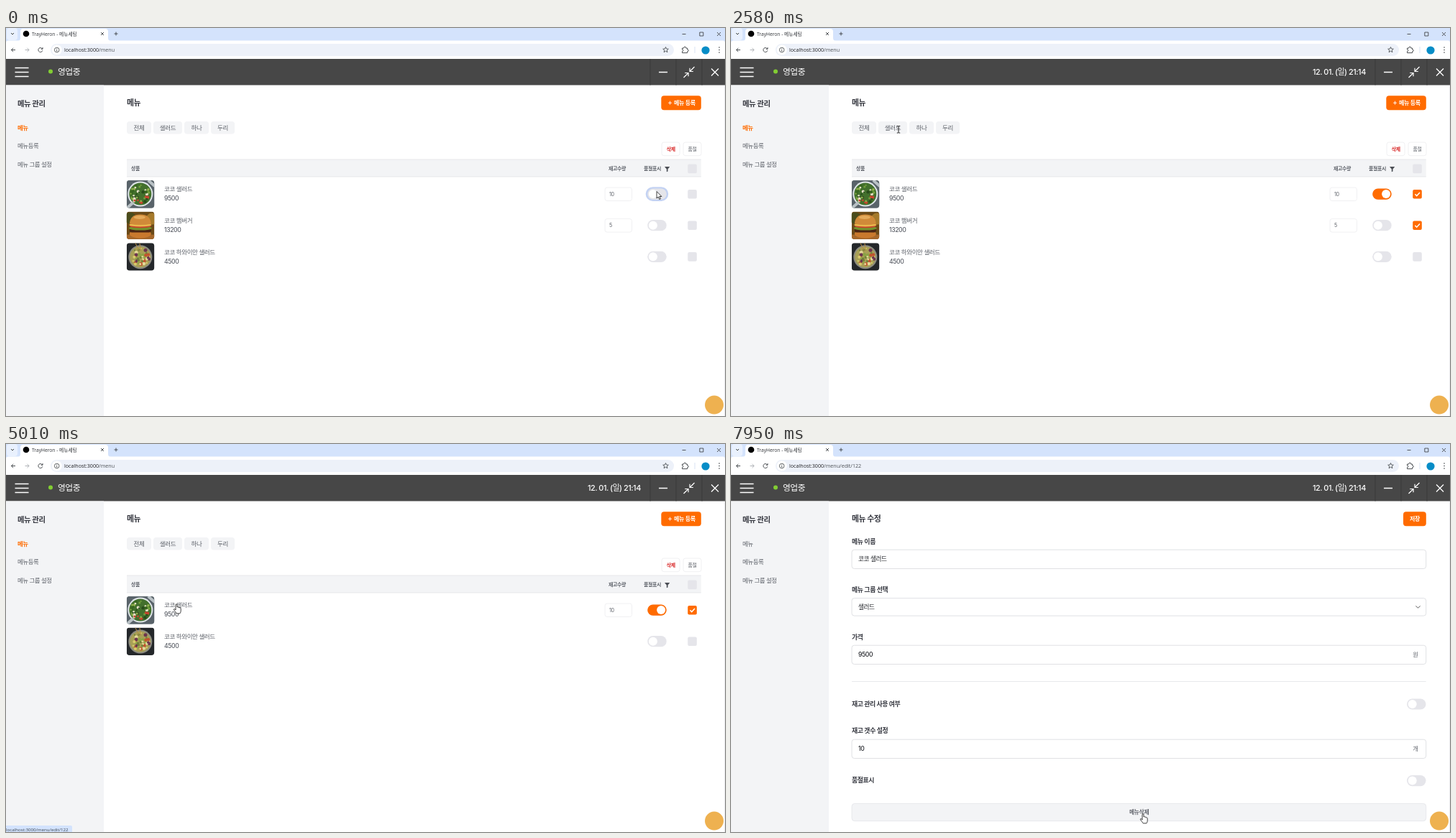
Recreate the animation shown at these times as an HTML page. Size 1000 px wide and 540 px high, loop 7980 ms.

```html
<!DOCTYPE html>
<html lang="ko">
<head>
<meta charset="utf-8">
<title>메뉴세팅</title>
<style>
  html, body { margin: 0; width: 100%; height: 100%; overflow: hidden; background: #fff; }
  svg { display: block; width: 100%; height: 100%; }
  text { font-family: Inter, "Noto Sans CJK KR", "Noto Sans CJK", sans-serif; letter-spacing: -.045em; white-space: pre; }
  .browser text { font-family: "Open Sans", "Noto Sans CJK KR", "Noto Sans CJK", sans-serif; letter-spacing: 0; }
</style>
</head>
<body>
<svg id="stage" viewBox="0 0 1000 540">
  <defs><clipPath id="round"><rect width="38.4" height="38.4" rx="4"/></clipPath></defs>
  <g id="frame"></g>
  <g id="view"></g>
  <g id="cursor"></g>
</svg>
<script>
const LOOP = 7980;
const ORANGE = '#ff6b00', PALE = '#f3f4f6', GREY = '#e5e5ea', INK = '#363840', SOFT = '#5c6068';
const T = { toggle: 120, checkFirst: 930, clock: 1110, checkSecond: 1290, filter: 3270, hover: 4320, open: 5130 };

const clamp = v => Math.max(0, Math.min(1, v));
const ease = v => v * v * (3 - 2 * v);
const between = (t, a, b) => t >= a && t < b;

const rect = (x, y, w, h, fill, rx = 0, more = '') =>
  `<rect x="${x}" y="${y}" width="${w}" height="${h}" rx="${rx}" fill="${fill}" ${more}/>`;
const circle = (x, y, r, fill, more = '') => `<circle cx="${x}" cy="${y}" r="${r}" fill="${fill}" ${more}/>`;
const ellipse = (x, y, rx, ry, fill) => `<ellipse cx="${x}" cy="${y}" rx="${rx}" ry="${ry}" fill="${fill}"/>`;
const line = (d, color, width = 1) => `<path d="${d}" fill="none" stroke="${color}" stroke-width="${width}"/>`;
const text = (x, y, s, size = 8.5, fill = INK, weight = 500, anchor = 'start') =>
  `<text x="${x}" y="${y}" font-size="${size}" fill="${fill}" font-weight="${weight}" text-anchor="${anchor}">${s}</text>`;
const box = (x, y, w, h, border = '#ececef', rx = 3) => rect(x, y, w, h, '#fff', rx, `stroke="${border}" stroke-width=".8"`);

// ---- pictures ----
function random(seed) {
  return () => (seed = seed * 16807 % 2147483647) / 2147483647;
}
function bowl(ground, rim, base, colors, seed, cx, cy, r) {
  const next = random(seed);
  let out = rect(0, 0, 39, 39, ground) + circle(cx, cy, r, rim) + circle(cx, cy, r - 2, base);
  for (let i = 0; i < 42; i++) {
    const angle = next() * 6.283, d = Math.sqrt(next()) * (r - 4);
    out += circle((cx + d * Math.cos(angle)).toFixed(1), (cy + d * Math.sin(angle)).toFixed(1),
      (1 + next() * 1.5).toFixed(1), colors[i % colors.length]);
  }
  return out;
}
const salad = rect(0, 0, 39, 39, '#7d858a') +
  bowl('#59636a', '#dfe5e8', '#43702d', ['#37651f', '#72a03b', '#c9432e', '#294c1c', '#e5dfc5', '#8fb04b'], 71, 19, 19, 17.5) +
  line('M0 39L9 31M30 0L39 8', '#b9c1c5', 4);
const burger = rect(0, 0, 39, 39, '#6b4a18') + circle(5, 9, 8, '#4a4c1c') + circle(35, 10, 8, '#a67a2b') +
  rect(0, 32, 39, 7, '#a5672b') + ellipse(19, 31, 15, 6, '#c9792d') + rect(4, 23, 30, 6, '#4a2513', 3) +
  ellipse(19, 23, 16, 3, '#75912d') + ellipse(19, 20, 15, 2.6, '#c8402b') + ellipse(19, 18.5, 15.5, 2.5, '#e9b64b') +
  '<path d="M4 17Q5 4 19 4T34 17Q19 20 4 17Z" fill="#d08a39"/>' + ellipse(18, 8, 8, 2.5, '#e4aa5b');
const hawaiian = bowl('#24272a', '#8c8b80', '#a8a056', ['#d9c96c', '#8ba345', '#c0552e', '#e4d998', '#6e8138', '#6d3650'], 29, 19, 19.5, 16.5) +
  line('M12 0L18 12M18 0L20 11', '#b58a45', 1);

// ---- window, header and sidebar ----
function browser() {
  const dark = '#3c4043';
  return `<g class="browser">` +
    rect(0, 0, 1000, 26, '#d4e3fc') + rect(1, 0, 15, 17, '#e9f1fe', 4) + line('M7 7l2 2 2-2', dark, 1) +
    '<path d="M16 18q4 0 4-4V5q0-4 4-4h114q4 0 4 4v9q0 4 4 4z" fill="#fff"/>' + rect(0, 17.5, 1000, 26, '#fff', 3) +
    circle(28, 8, 4.3, '#000') + text(36, 10.6, 'TrayHeron - 메뉴세팅', 6.7, '#303338', 400) +
    line('M132 6l4 4m0-4l-4 4M150.500 8h5M153 5.500v5', dark, .9) +
    line('M940.500 8.500h5M964.800 6h5v5h-5zM989 6l5 5m0-5l-5 5', '#333', .8) +
    line('M13 30.500H7.500m2.600-2.700L7.400 30.500l2.700 2.700', dark, .9) +
    line('M26.500 30.500H32m-2.600-2.700l2.700 2.700-2.700 2.700', '#a9acb0', .9) +
    line('M50.500 29a3 3 0 1 0 .3 2.300M51 27v2.300h-2.300', dark, .9) +
    rect(62, 22, 867, 17, '#edf1f9', 8.5) + circle(70.7, 30.5, 7, '#fff') +
    circle(70.7, 30.5, 3.3, 'none', `stroke="${dark}" stroke-width=".8"`) + line('M70.700 28.500v.9m0 .8v2.300', dark, .9) +
    line('M917.500 26.500l1.100 2.500 2.700.2-2.100 1.800.7 2.700-2.400-1.500-2.400 1.500.7-2.700-2.100-1.800 2.700-.2z', dark, .8) +
    line('M940.500 28h2.300q0-2 1.400-2t1.400 2h2v2q1.700 0 1.700 1.300t-1.700 1.300v2h-7.100v-2q1.400 0 1.400-1.300t-1.400-1.300z', dark, .9) +
    line('M958 26v9', '#d0dcf0', .8) + circle(973, 31, 5.6, '#078dc7') +
    [27, 30.5, 34].map(y => circle(992, y, .8, dark)).join('') + '</g>';
}
function appHeader() {
  return rect(0, 43, 1000, 36.5, '#474747') +
    line('M12.500 55.500h19M12.500 61.500h19M12.500 67.500h19', '#fff', 1.4) +
    circle(62, 60.5, 3, '#82cd33') + text(72, 64.6, '영업중', 11.8, '#fff') +
    line('M896 43v36.500M932 43v36.500M968 43v36.500', '#3b3b3b') +
    line('M908 61.500h12M981 56.500l10 10m0-10l-10 10', '#fff', 1.3) +
    line('M957.500 54l-6.500 6.500m0-4.700v4.700h4.800M942.500 69l6.500-6.500m-4.800 0h4.800v4.700', '#fff', 1.2);
}
document.getElementById('frame').innerHTML = rect(0, 0, 1000, 540, '#fff') + browser() + appHeader() +
  rect(0, 79.5, 136, 461, PALE) + line('M999.500 80v460', '#ededf0') +
  text(16, 109, '메뉴 관리', 10.4, INK, 600) + text(16, 167, '메뉴등록', 8.4, SOFT) +
  text(16, 193.4, '메뉴 그룹 설정', 8.4, SOFT) + circle(985, 524.6, 13, '#eeb150');

// ---- controls ----
function toggle(x, y, on = 0, ring = false) {
  return (ring ? rect(x - 2.5, y - 2.3, 31.5, 19.8, '#c3d2f3', 9.9) : '') +
    rect(x, y, 26.5, 15.2, GREY, 7.6) + rect(x, y, 26.5, 15.2, ORANGE, 7.6, `opacity="${on}"`) +
    circle(x + 7.7 + on * 11.2, y + 7.6, 6, '#fff');
}
function checkbox(y, on = false, ring = false) {
  return (ring ? rect(946, y - 2, 17, 17, '#bfd0f5', 3.5) : '') + rect(948.2, y, 12.6, 12.6, on ? ORANGE : GREY, 2) +
    (on ? line(`M951.400 ${y + 6.4}l2.300 2.300 4.300-4.600`, '#fff', 1.5) : '');
}
function chip(x, w, label) {
  return rect(x, 130, w, 17.6, PALE, 4) + text(x + w / 2, 141.8, label, 8.5, SOFT, 500, 'middle');
}
function field(y, h, value, unit = '') {
  return box(168, y, 798.7, h, '#d9dade', 3.5) + text(177, y + h / 2 + 2.9, value, 8.6, '#25272c') +
    text(955.5, y + h / 2 + 2.9, unit, 8.2, SOFT, 400, 'end');
}

// ---- pages ----
function menuRow(item, y) {
  return `<g transform="translate(167.800 ${y})" clip-path="url(#round)">${item.picture}</g>` +
    text(220, y + 15.4, item.name, 8.5, SOFT) + text(220, y + 28.3, item.price, 8.6, SOFT) +
    (item.stock ? box(833, y + 10, 37.5, 18.5) + text(839, y + 21.8, item.stock, 7.2, SOFT, 400) : '') +
    toggle(892.2, y + 11.5, item.soldOut, item.toggleRing) + checkbox(y + 12.9, item.checked, item.checkRing);
}
function listPage(t) {
  const items = [
    { name: '코코 샐러드', price: 9500, stock: '10', picture: salad, soldOut: ease(clamp((t - T.toggle) / 150)),
      toggleRing: t < T.toggle, checked: t >= T.checkFirst, checkRing: between(t, 750, T.checkFirst) },
    { name: '코코 햄버거', price: 13200, stock: '5', picture: burger, soldOut: 0,
      checked: t >= T.checkSecond, checkRing: between(t, T.checkSecond - 110, T.checkSecond) },
    { name: '코코 하와이안 샐러드', price: 4500, picture: hawaiian, soldOut: 0 },
  ].filter(item => t < T.filter || item.name.endsWith('샐러드'));
  return text(168, 107.7, '메뉴', 10.9, INK, 600) +
    rect(911.3, 94.2, 55.5, 20, ORANGE, 4) + line('M921 104.200h5m-2.500-2.500v5', '#fff', .9) +
    text(929, 107.1, '메뉴 등록', 8.1, '#fff', 700) +
    chip(168, 34, '전체') + chip(205, 40, '샐러드') + chip(248, 34, '하나') + chip(285, 33, '두리') +
    box(912, 159, 25, 18.7) + text(924.8, 170.6, '삭제', 6.9, '#d92b2b', 700, 'middle') +
    box(942, 159, 25, 18.7) + text(954.5, 170.6, '품절', 6.9, SOFT, 500, 'middle') +
    rect(168, 183, 798.7, 24, PALE) + line('M168 183h798.700M168 207h798.700', '#dfe0e4', .7) +
    text(174, 198.3, '상품', 6.9, SOFT, 600) + text(838, 198.3, '재고수량', 6.9, SOFT, 600) +
    text(887, 198.3, '품절표시', 6.9, SOFT, 600) +
    '<path d="M916 193h7.200l-2.700 3.400v3l-1.700.8v-3.800z" fill="#4b4e55"/>' + checkbox(189.6) +
    items.map((item, i) => menuRow(item, 212 + i * 43.6)).join('');
}
function editPage() {
  const label = (y, s, weight = 600) => text(168, y, s, 8.9, INK, weight);
  return text(168, 107.7, '메뉴 수정', 10.9, INK, 600) + rect(935, 94.2, 31.8, 20, ORANGE, 4) +
    text(951, 107.1, '저장', 8, '#fff', 700, 'middle') +
    label(138.7, '메뉴 이름') + field(147.2, 26.3, '코코 샐러드') +
    label(206, '메뉴 그룹 선택') + field(214.6, 24.5, '샐러드') + line('M952.500 225.300l3 3 3-3', '#555', 1) +
    label(271.5, '가격') + field(280.2, 26.3, '9500', '원') + line('M168 330.500h798.700', '#e3e4e8', .8) +
    label(364.8, '재고 관리 사용 여부', 700) + toggle(940, 354.4) +
    label(402.4, '재고 갯수 설정') + field(411.2, 26.3, '10', '개') +
    label(471.2, '품절표시', 700) + toggle(940, 461) +
    rect(168, 500.4, 798.7, 24.3, PALE, 4, 'stroke="#e4e5e9" stroke-width=".8"') +
    text(567.6, 515, '메뉴삭제', 7.8, '#62656d', 600, 'middle');
}
function view(t) {
  const editing = t >= T.open;
  const status = clamp((t - T.hover) / 90) * clamp((5370 - t) / 90);
  return (editing ? editPage() : listPage(t)) +
    text(16, 141.7, '메뉴', 8.4, editing ? SOFT : ORANGE, editing ? 500 : 600) +
    (t >= T.clock ? text(809, 65.3, '12. 01. (일) 21:14', 10.9, '#fff') : '') +
    '<g class="browser">' + text(81, 33.1, `localhost:3000<tspan fill="#4d5156">/menu${editing ? '/edit/122' : ''}</tspan>`, 7.13, '#202124', 400) +
    `<g opacity="${status}">` + rect(-3, 531, 95, 12, '#d3e3fd', 2) +
    text(0, 539.3, 'localhost:3000/menu/edit/122', 6.17, '#3c4652', 400) + '</g></g>';
}

// ---- mouse ----
const path = [
  [0, 905, 227.5], [270, 905, 227.5], [690, 955, 232], [960, 955, 232], [1170, 955, 274], [1380, 955, 274],
  [1620, 927, 187], [1710, 927, 187], [2400, 233, 141], [3840, 233, 141], [4380, 237, 223], [5520, 237, 223],
  [6180, 902.500, 351], [6600, 902.500, 351], [7560, 573, 515], [LOOP, 573, 515],
];
const shapes = {
  arrow: '<path d="M0 0v9.500l2.200-2 1.600 3.500 1.600-.7L3.800 7h3.100z" fill="#fff" stroke="#111" stroke-width=".8"/>',
  beam: line('M-2.200-4.500h1.700l.5.5.5-.5h1.700M0-4v8.500M-2.200 5h1.700l.5-.5.5.5h1.700', '#222', 1),
  hand: '<path d="M-1 7V.8Q-1-.3 0-.3t1 1.100V4q.5-.6 1.300-.3.7.2.7.8.6-.5 1.200-.2.600.2.600.9.500-.3.9 0 .500.3.500 1v3q0 2-1.300 3.700H.2Q-1.200 10.800-3.500 7.800q-.5-1 .3-1.300T-1 8z" fill="#fff" stroke="#111" stroke-width=".8"/>',
};
function cursor(t) {
  const i = path.findIndex(p => p[0] > t), [t0, x0, y0] = path[i - 1], [t1, x1, y1] = path[i];
  const k = ease((t - t0) / (t1 - t0)), x = x0 + (x1 - x0) * k, y = y0 + (y1 - y0) * k;
  const link = t < T.open ? x < 300 && y > 212 : y > 500;
  const label = t < T.open && x > 213 && x < 237 && y > 133 && y < 147;
  return `<g transform="translate(${x} ${y})">${shapes[link ? 'hand' : label ? 'beam' : 'arrow']}</g>`;
}

const viewLayer = document.getElementById('view'), cursorLayer = document.getElementById('cursor');
let shown = '';
function draw() {
  const t = performance.now() % LOOP, next = view(t);
  if (next !== shown) viewLayer.innerHTML = shown = next;
  cursorLayer.innerHTML = cursor(t);
  requestAnimationFrame(draw);
}
draw();
</script>
</body>
</html>
```
